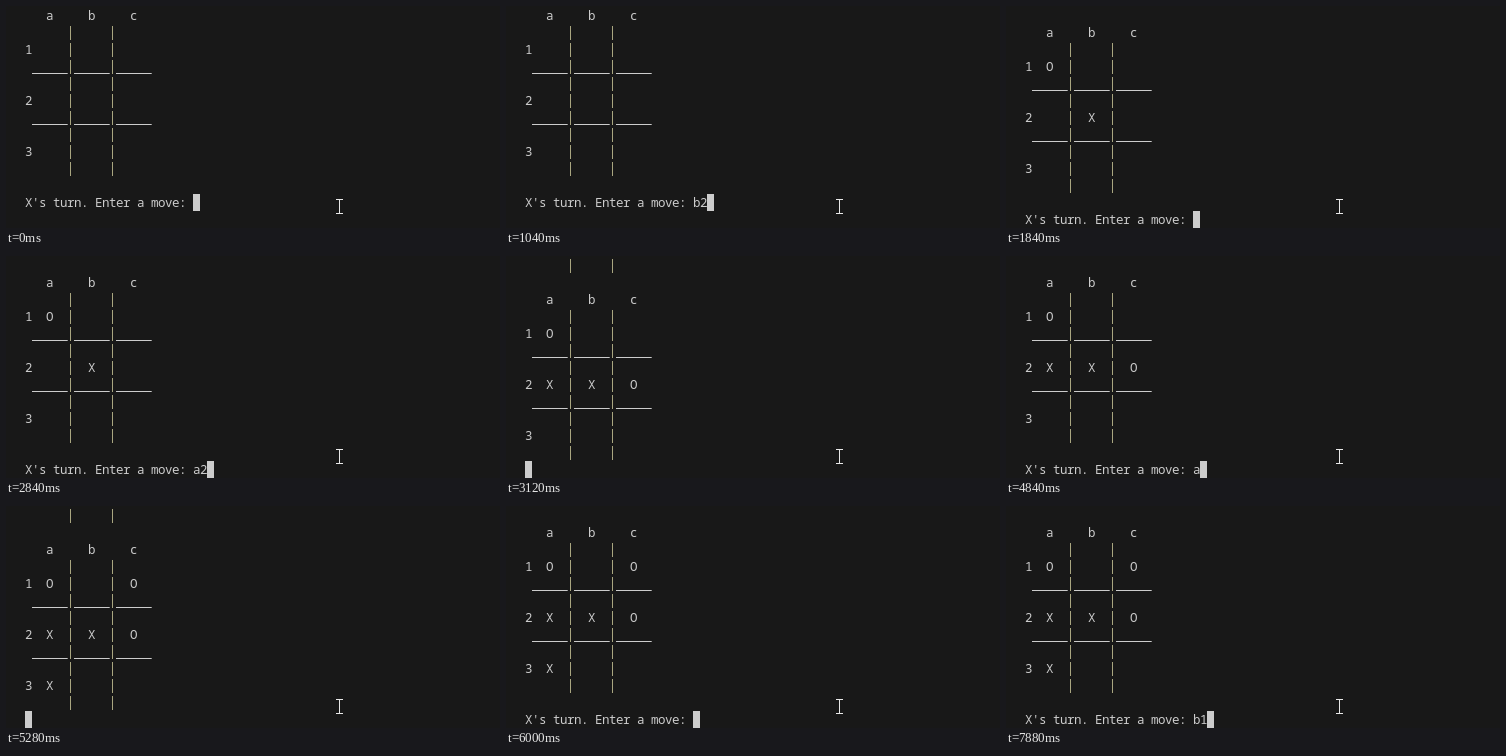
An HTML page with a canvas for the animation above (8 s loop, 494 by 222 pixels).

```html
<!DOCTYPE html>
<html lang="en">
<head>
<meta charset="utf-8">
<title>Tic-tac-toe in a terminal</title>
<style>
  html, body { margin: 0; width: 100%; height: 100%; overflow: hidden; background: #181818; }
  canvas { display: block; }
</style>
</head>
<body>
<canvas id="stage" width="494" height="222"></canvas>
<script>
const ctx = document.getElementById('stage').getContext('2d');
const LOOP = 8000;
const LEFT = 19, CELL = 7, LINE = 17;
const GLYPH = 7.7; // glyphs are slightly wider than their cells
const BG = '#181818', INK = '#cccccc', PIPE = '#a9a680', POINTER = '#e8e8e8';
const PROMPT = "X's turn. Enter a move: ";

// Nine cells, row by row
const EMPTY = '         ';
const FIRST = 'O   X    ';
const SECOND = 'O  XXO   ';
const THIRD = 'O OXXOX  ';

// at: start in ms, top: y of the board header, typed: null while no prompt is shown
const steps = [
  { at: 0, top: 1, cells: EMPTY, typed: '' },
  { at: 800, top: 1, cells: EMPTY, typed: 'b' },
  { at: 1040, top: 1, cells: EMPTY, typed: 'b2' },
  { at: 1840, top: 18, cells: FIRST, typed: '' },
  { at: 2840, top: 18, cells: FIRST, typed: 'a2' },
  { at: 3000, top: 35, cells: SECOND, typed: null },
  { at: 3760, top: 18, cells: SECOND, typed: '' },
  { at: 4840, top: 18, cells: SECOND, typed: 'a' },
  { at: 4920, top: 18, cells: SECOND, typed: 'a3' },
  { at: 5200, top: 35, cells: THIRD, typed: null },
  { at: 5800, top: 18, cells: THIRD, typed: '' },
  { at: 7880, top: 18, cells: THIRD, typed: 'b1' }
];

function boardLines(cells) {
  const bars = '      |     |';
  const rule = ' _____|_____|_____';
  const lines = ['   a     b     c'];
  for (let r = 0; r < 3; r++) {
    const [a, b, c] = cells.slice(r * 3, r * 3 + 3);
    lines.push(bars, `${r + 1}  ${a}  |  ${b}  |  ${c}`, r < 2 ? rule : bars);
  }
  return lines;
}

function rect(color, x, y, w, h) {
  ctx.fillStyle = color;
  ctx.fillRect(x, y, w, h);
}

function drawChar(ch, x, y) {
  if (ch === '|') {
    rect(PIPE, x + 3, y + 2, 1, 14);
  } else if (ch === '_') {
    rect(INK, x, y + 15, GLYPH, 1);
  } else if (ch !== ' ') {
    ctx.fillStyle = INK;
    ctx.fillText(ch, x + GLYPH / 2, y + 13);
  }
}

function drawLine(text, y) {
  [...text].forEach((ch, i) => drawChar(ch, LEFT + i * CELL, y));
}

function drawPointer() {
  rect(POINTER, 333, 193, 1, 15);
  for (const y of [193, 207]) rect(POINTER, 330, y, 7, 1);
}

function draw(time) {
  const step = steps.filter(s => s.at <= time).pop();
  rect(BG, 0, 0, 494, 222);
  ctx.font = '500 12.5px "Noto Sans Mono", "DejaVu Sans Mono", monospace';
  ctx.textAlign = 'center';

  boardLines(step.cells).forEach((line, i) => drawLine(line, step.top + i * LINE));

  let cursorX = LEFT, cursorY = step.top + 10 * LINE;
  if (step.typed === null) {
    drawLine('      |     |', step.top - 2 * LINE);
  } else {
    const line = PROMPT + step.typed;
    cursorX += line.length * CELL;
    cursorY += LINE;
    drawLine(line, cursorY);
  }
  rect(INK, cursorX, cursorY, CELL, LINE);
  drawPointer();
}

const start = performance.now();
function tick() {
  draw((performance.now() - start) % LOOP);
  requestAnimationFrame(tick);
}
tick();
</script>
</body>
</html>
```
